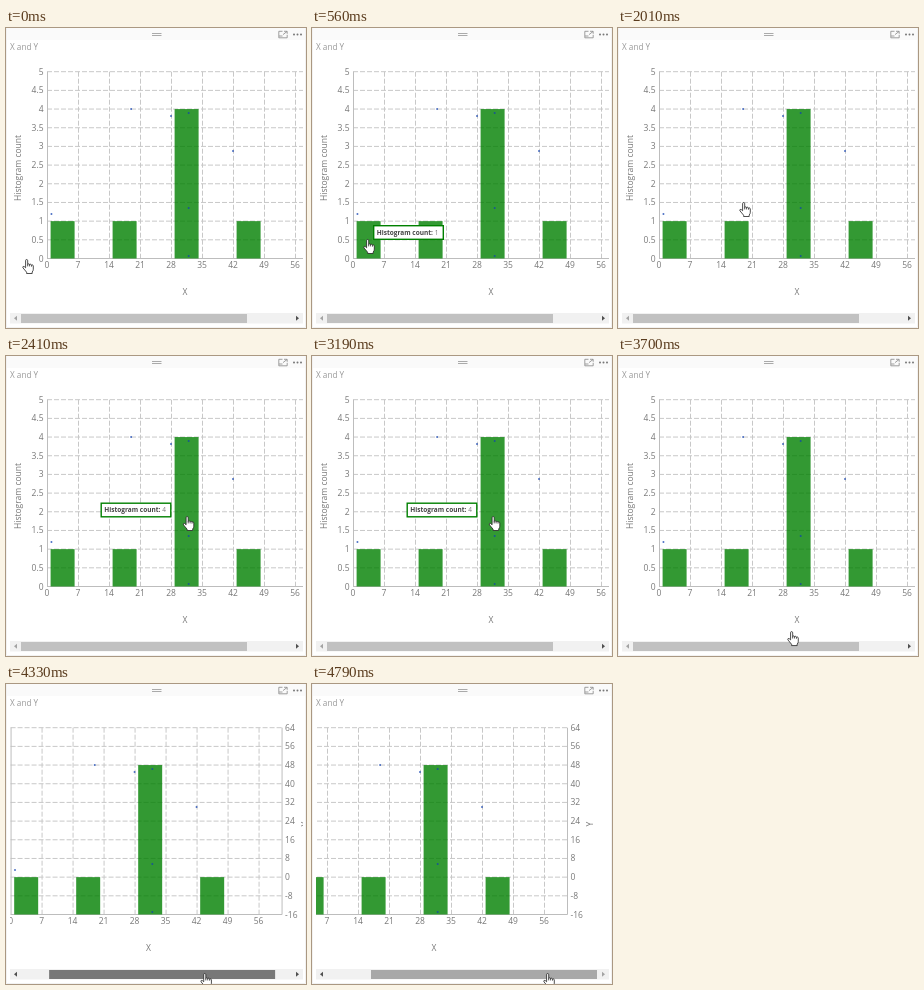
These frames come from a looping animation (300x300 px, 5.17 s). An HTML page:

```html
<!DOCTYPE html>
<html lang="en">
<head>
<meta charset="utf-8">
<title>Scrolling histogram</title>
<style>
  html, body { margin: 0; width: 100%; height: 100%; overflow: hidden; background: #fff; }
  svg { display: block; width: 100vw; height: 100vh; }
  text { font-family: "Open Sans", "Noto Sans", sans-serif; font-size: 8.5px; fill: #777; }
  .title { font-size: 8.2px; fill: #999; }
  .grid { stroke: #c8c8c8; stroke-dasharray: 5 2; }
  .axis { stroke: #bdbdbd; }
  .tip text { font-size: 6.5px; }
  .tip .name { font-weight: 700; fill: #444; }
</style>
</head>
<body>
<svg viewBox="0 0 300 300">
  <defs><clipPath id="view"><rect x="4" y="26" width="293" height="258"/></clipPath></defs>
  <rect width="300" height="300" fill="#fff"/>
  <rect width="300" height="12" fill="#fafafa"/>
  <path d="M.5 0V299.5H299.5V0" fill="none" stroke="#f2f2f2"/>
  <path d="M146 5.5h9.5M146 7.5h9.5" stroke="#aaa"/>
  <path d="M276.5 3.3H272.8V9.8H281.2V6.8M278 3.3H281.2V5.8M281 3.5L277 6.6M273 8H276.5"
    fill="none" stroke="#888" stroke-width=".8"/>
  <g fill="#777"><circle cx="288" cy="6.5" r="1"/><circle cx="291.5" cy="6.5" r="1"/><circle cx="295" cy="6.5" r="1"/></g>
  <text class="title" x="4" y="21.5">X and Y</text>

  <g clip-path="url(#view)"><g id="chart"></g></g>

  <rect x="4" y="285" width="293" height="10.5" fill="#f1f1f1"/>
  <path id="back" d="M11 287.8V292.8L8 290.3Z"/>
  <path id="next" d="M290 287.8V292.8L293 290.3Z"/>
  <rect id="thumb" y="286" width="226" height="9"/>

  <g id="tip" class="tip">
    <rect x=".7" y=".7" width="69.6" height="13.6" fill="#fff" stroke="#008000" stroke-width="1.4"/>
    <text x="3.8" y="9.9"><tspan class="name">Histogram count:</tspan> <tspan id="count"></tspan></text>
  </g>
  <path id="hand" fill="#fff" stroke="#222" stroke-width=".8" stroke-linejoin="round"
    d="M3.6 8.8V1.7Q3.6 .5 4.6 .5T5.7 1.7V5.6Q5.8 4.8 6.6 4.8T7.6 5.7Q7.8 5.1 8.5 5.2T9.5 6.2Q9.8 5.7 10.5 5.9T11.3 7V10.2Q11.3 11.8 10.2 13V14.5H4.6V13.2L1.1 9Q.3 7.8 1.2 7.4T3.6 8.8ZM5.7 5.6V7.4M7.6 5.7V7.4M9.5 6.2V7.6"/>
</svg>
<script>
const LOOP = 5170;
const LEFT = 41, RIGHT = 312.5, TOP = 43.7, BASE = 230.5;
const ROW = (BASE - TOP) / 10;
const MAX_THUMB = 44, SCROLL_RATIO = 57 / MAX_THUMB;
const GRAB = { time: 3900, x: 166 };
const RELEASE = 4790;

// time, x, y of the pointer's top left corner
const pointerPath = [
  [0, 16, 231], [290, 16, 231], [540, 51, 211],
  [709, 51, 211], [710, 51, 210], [889, 51, 210], [890, 50, 210],
  [1535, 50, 209.5], [1810, 126, 182], [2000, 121, 174],
  [2030, 121, 174], [2400, 176.5, 160], [3200, 176.5, 160],
  [3700, 169, 275], [3860, 166, 289], [4090, 166, 289],
  [4120, 168.7, 289], [4330, 194, 289], [4650, 231, 289], [LOOP, 231, 289]
];
const tips = [
  { from: 540, to: 1620, x: 61, y: 197, count: 1 },
  { from: 2400, to: 3400, x: 94.5, y: 146.5, count: 4 }
];

const $ = id => document.getElementById(id);
const chart = $('chart');
const xAt = value => LEFT + value * 31 / 7;
const yAt = value => BASE - value * 2 * ROW;

function add(tag, attrs, text) {
  const node = document.createElementNS('http://www.w3.org/2000/svg', tag);
  for (const key in attrs) node.setAttribute(key, attrs[key]);
  if (text !== undefined) node.textContent = text;
  chart.append(node);
}
const line = (x1, y1, x2, y2, kind) => add('line', { x1, y1, x2, y2, class: kind });
const label = (x, y, anchor, text) => add('text', { x, y, 'text-anchor': anchor }, text);
const sideLabel = (x, text) => add('text',
  { 'text-anchor': 'middle', transform: `translate(${x} 140) rotate(-90)` }, text);

function buildChart() {
  for (let i = 0; i <= 10; i++) {
    const y = BASE - i * ROW;
    if (i) line(LEFT, y, RIGHT, y, 'grid');
    label(37.5, y + 3, 'end', i / 2);
    label(315.5, y + 3, 'start', i * 8 - 16);
  }
  for (let value = 0; value <= 56; value += 7) {
    const x = xAt(value) + .5;
    if (value) line(x, TOP, x, BASE, 'grid');
    label(xAt(value), 240, 'middle', value);
  }
  line(LEFT + .5, TOP, LEFT + .5, BASE, 'axis');
  line(RIGHT, TOP, RIGHT, BASE, 'axis');
  line(LEFT, BASE, RIGHT, BASE, 'axis');

  [1, 1, 4, 1].forEach((count, i) => add('rect', {
    x: 44.6 + i * 62, y: yAt(count), width: 24, height: BASE - yAt(count),
    fill: '#008000', 'fill-opacity': .8
  }));
  const points = [[1, 186], [19, 81], [28, 88], [32, 85], [32, 180], [32, 228], [42, 123]];
  for (const [value, cy] of points) {
    add('circle', { cx: xAt(value), cy, r: 1, fill: '#1040b0', 'fill-opacity': .75 });
  }

  label(179, 267, 'middle', 'X');
  sideLabel(15, 'Histogram count');
  sideLabel(338, 'Y');
}

function pointerAt(time) {
  const next = pointerPath.findIndex(key => key[0] > time);
  const [t0, x0, y0] = pointerPath[next - 1];
  const [t1, x1, y1] = pointerPath[next];
  const k = (time - t0) / (t1 - t0);
  return { x: x0 + (x1 - x0) * k, y: y0 + (y1 - y0) * k };
}

function render(time) {
  const pointer = pointerAt(time);
  const grabbed = time >= GRAB.time;
  const offset = grabbed ? Math.min(MAX_THUMB, Math.max(0, pointer.x - GRAB.x)) : 0;
  const pressed = grabbed && time < RELEASE;

  $('hand').setAttribute('transform', `translate(${pointer.x} ${pointer.y})`);
  chart.setAttribute('transform', `translate(${-offset * SCROLL_RATIO} 0)`);
  $('thumb').setAttribute('x', 15 + offset);
  $('thumb').setAttribute('fill', pressed ? '#787878' : pointer.y > 285 ? '#a8a8a8' : '#c1c1c1');
  $('back').setAttribute('fill', offset > 0 ? '#505050' : '#a3a3a3');
  $('next').setAttribute('fill', offset < MAX_THUMB ? '#505050' : '#a3a3a3');

  const tip = tips.find(item => time >= item.from && time < item.to);
  $('tip').setAttribute('visibility', tip ? 'visible' : 'hidden');
  if (tip) {
    $('tip').setAttribute('transform', `translate(${tip.x} ${tip.y})`);
    $('count').textContent = tip.count;
  }
}

buildChart();
const start = performance.now();
function tick() {
  render((performance.now() - start) % LOOP);
  requestAnimationFrame(tick);
}
tick();
</script>
</body>
</html>
```
